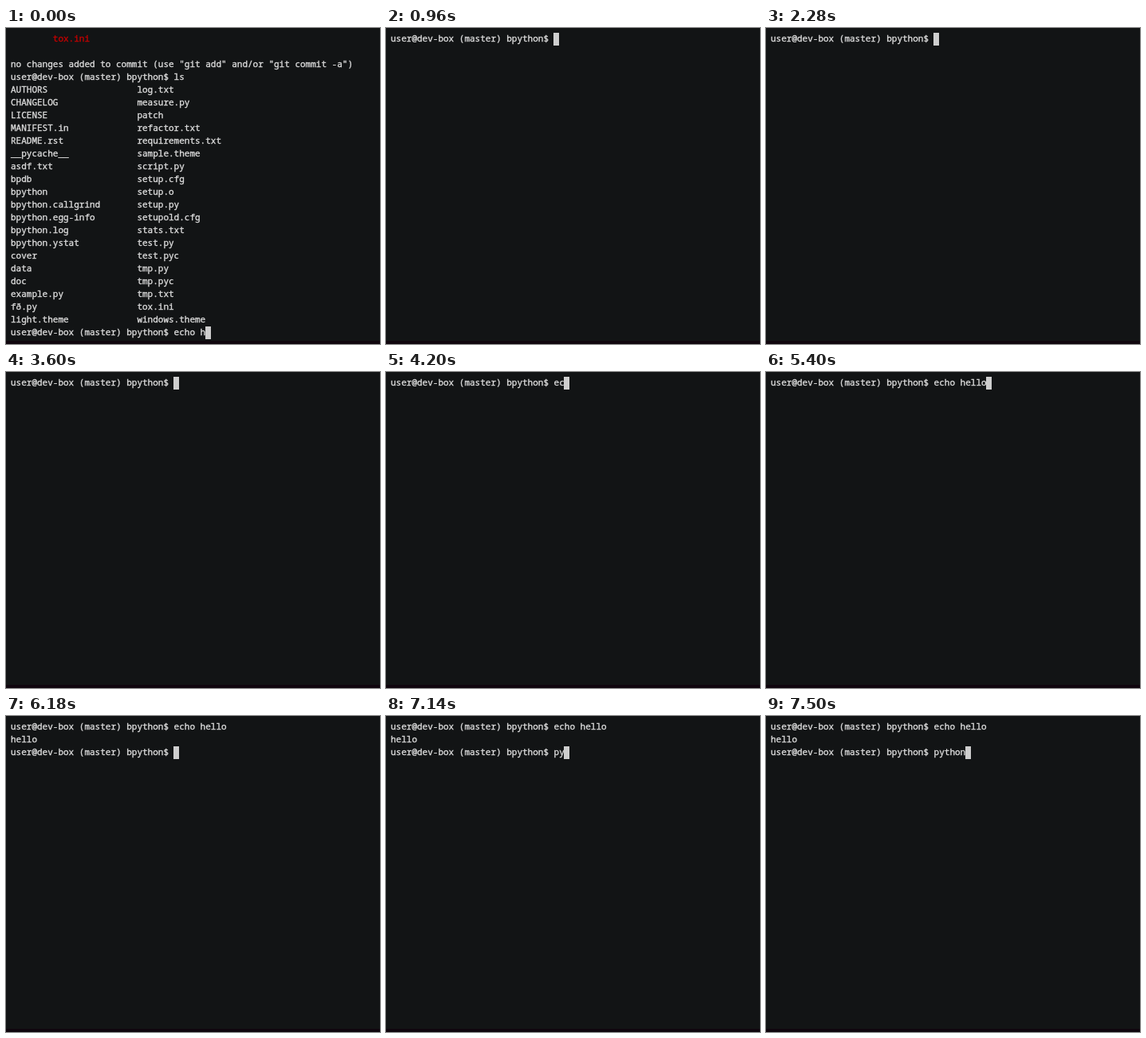
An HTML page that plays this animation: 469 px wide and 396 px high, repeating every 8000 ms.

```html
<!DOCTYPE html>
<html lang="en">
<head>
<meta charset="utf-8">
<title>Terminal session</title>
<style>
  html, body { margin: 0; width: 100%; height: 100%; overflow: hidden; background: #121415; }
  svg { display: block; }
  text {
    font: 11px "Noto Sans Mono", "DejaVu Sans Mono", monospace; white-space: pre;
    fill: currentColor; stroke: currentColor; stroke-width: .35px; color: #dcdcdc;
  }
  .red { color: #c40000; }
</style>
</head>
<body>
<svg width="469" height="396" viewBox="0 0 469 396">
  <rect width="469" height="396" fill="#121415"/>
  <rect y="392" width="469" height="4" fill="#10060e"/>
  <g id="screen"></g>
</svg>
<script>
const LOOP = 8000, LEFT = 6, CELL = 6.6, ROW = 16;
const PROMPT = "user@dev-box (master) bpython$ ";
const screen = document.getElementById("screen");

const leftFiles = `AUTHORS CHANGELOG LICENSE MANIFEST.in README.rst __pycache__ asdf.txt bpdb bpython
  bpython.callgrind bpython.egg-info bpython.log bpython.ystat cover data doc example.py fð.py
  light.theme`.split(/\s+/);
const rightFiles = `log.txt measure.py patch refactor.txt requirements.txt sample.theme script.py
  setup.cfg setup.o setup.py setupold.cfg stats.txt test.py test.pyc tmp.py tmp.pyc tmp.txt tox.ini
  windows.theme`.split(/\s+/);

const listing = [
  "        tox.ini",
  "",
  'no changes added to commit (use "git add" and/or "git commit -a")',
  PROMPT + "ls",
  ...leftFiles.map((name, i) => name.padEnd(24) + rightFiles[i]),
  PROMPT + "echo h"
];

// Key press times for each command
const echoKeys = [3900, 4140, 4260, 4320, 4440, 4620, 4860, 4920, 5160, 5400];
const pythonKeys = [7020, 7140, 7200, 7320, 7380, 7500];
const typed = (command, keys, t) => command.slice(0, keys.filter(k => k <= t).length);

function linesAt(t) {
  if (t < 960) return listing;
  const first = PROMPT + typed("echo hello", echoKeys, t);
  if (t < 6120) return [first];
  if (t < 6180) return [first, ""];
  return [first, "hello", PROMPT + typed("python", pythonKeys, t)];
}

const cursorHidden = t =>
  [[1620, 2280], [2940, 3600], [6060, 6120], [6840, 7020]].some(([from, to]) => t >= from && t < to);

function render(t) {
  const lines = linesAt(t);
  let markup = lines.map((line, i) => {
    const indent = line.length - line.trimStart().length;
    const style = indent ? ' class="red"' : "";
    return `<text x="${LEFT + indent * CELL}" y="${17 + i * ROW}"${style}>${line.slice(indent)}</text>`;
  }).join("");
  if (!cursorHidden(t)) {
    const row = lines.length - 1;
    const x = Math.floor(LEFT + lines[row].length * CELL);
    markup += `<rect x="${x}" y="${6 + row * ROW}" width="7" height="16" fill="#cecece"/>`;
  }
  return markup;
}

let shown = "";
function tick() {
  const markup = render(performance.now() % LOOP);
  if (markup !== shown) screen.innerHTML = shown = markup;
  requestAnimationFrame(tick);
}
tick();
</script>
</body>
</html>
```
